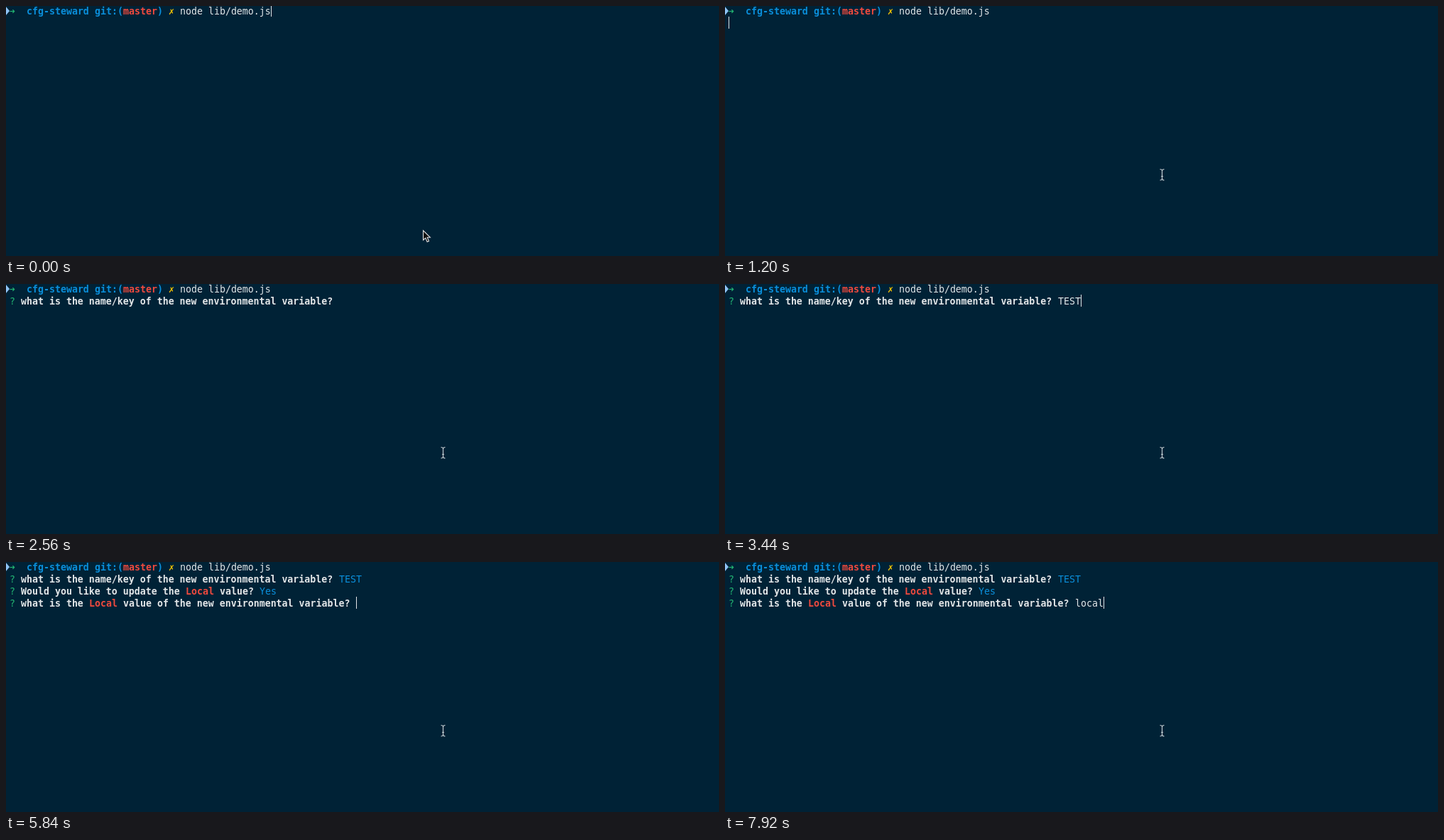
An HTML page with a canvas for the animation above (8000 ms loop, 1004 by 353 pixels).

```html
<!DOCTYPE html>
<html lang="en">
<head>
<meta charset="utf-8">
<title>Terminal session</title>
<style>
  html, body { margin: 0; height: 100%; overflow: hidden; background: #002236; }
  canvas { display: block; }
</style>
</head>
<body>
<canvas id="stage" width="1004" height="353"></canvas>
<script>
const ctx = document.getElementById('stage').getContext('2d');
const LOOP = 8000, COL = 8, ROW = 17, LEFT = 5, BASELINE = 12;
const BG = '#002236', WHITE = '#e3e6e8', BLUE = '#0a8fdb', RED = '#f04a3e',
      GREEN = '#22b573', YELLOW = '#fdc800', GRAY = '#5c7787';

function put(text, col, row, color, bold) {
  ctx.font = `${bold ? 'bold ' : ''}13.288px "DejaVu Sans Mono", monospace`;
  ctx.fillStyle = color;
  ctx.fillText(text, LEFT + col * COL, BASELINE + row * ROW);
}

// Each part is [text, color, bold]; returns the column after the last one.
function line(row, parts) {
  let col = 0;
  for (const [text, color, bold] of parts) {
    put(text, col, row, color, bold);
    col += text.length;
  }
  return col;
}

const question = (row, ...parts) => line(row, [['? ', GREEN], ...parts]);
const bold = (text, color = WHITE) => [text, color, true];

function caret(col, row) {
  ctx.fillStyle = WHITE;
  ctx.fillRect(LEFT + col * COL, row * ROW - 2, 1, ROW);
}

// Number of key presses made so far.
const typed = (t, times) => times.filter(time => t >= time).length;

function prompt() {
  ctx.fillStyle = '#8fc3f5';
  ctx.beginPath();
  ctx.moveTo(0, 1);
  ctx.lineTo(5, 7);
  ctx.lineTo(0, 13);
  ctx.fill();
  line(0, [
    bold('➜  ', GREEN), bold('cfg-steward ', BLUE), bold('git:(', BLUE),
    bold('master', RED), bold(') ', BLUE), bold('✗ ', YELLOW), ['node lib/demo.js', WHITE],
  ]);
}

function terminal(t) {
  prompt();
  if (t < 1200) {
    if (t < 560 || t >= 1040) caret(46, 0);
    return;
  }
  if (t < 1760) return caret(0, 1);

  const answered = t >= 3920, chosen = t >= 5840;
  const key = 'TEST'.slice(0, typed(t, [3120, 3200, 3280, 3440]));
  const keyEnd = question(1, bold('what is the name/key of the new environmental variable? '),
    [key, answered ? BLUE : WHITE]);
  if (!answered) {
    if (t < 2560 || t >= 3040) caret(keyEnd, 1);
    return;
  }

  question(2, bold('Would you like to update the '), bold('Local', RED), bold(' value? '),
    chosen ? ['Yes', BLUE] : ['(Use arrow keys)', GRAY]);
  if (!chosen) {
    put('❯ Yes', 0, 3, BLUE);
    put('No', 2, 4, WHITE);
    return;
  }

  const value = 'local'.slice(0, typed(t, [7520, 7680, 7760, 7840, 7920]));
  const valueEnd = question(3, bold('what is the '), bold('Local', RED),
    bold(' value of the new environmental variable? '), [value, WHITE]);
  if (t < 6640 || t >= 7120) caret(valueEnd, 3);
}

function arrowPointer(x, y) {
  const shape = new Path2D('M0 0V13.5L3.2 10.6L5.6 16L8 15L5.7 9.7H9.8Z');
  ctx.save();
  ctx.translate(x, y);
  ctx.fillStyle = '#101010';
  ctx.fill(shape);
  ctx.strokeStyle = '#e4e4e4';
  ctx.lineWidth = 1.1;
  ctx.stroke(shape);
  ctx.restore();
}

function textPointer(x, y) {
  ctx.save();
  ctx.translate(x + 0.5, y + 0.5);
  ctx.strokeStyle = '#c3cbd0';
  ctx.lineWidth = 1.2;
  ctx.stroke(new Path2D('M-3 -8Q0 -8 0 -5.5Q0 -8 3 -8M0 -5.5V5M-3 7.5Q0 7.5 0 5Q0 7.5 3 7.5M-1.5 2H1.5'));
  ctx.restore();
}

function pointer(t) {
  if (t < 80) return arrowPointer(587.5, 317);
  const p = Math.min(1, Math.floor(t / 80) / 4), q = 1 - p;
  const bend = (from, via, to) => q * q * from + 2 * q * p * via + p * p * to;
  textPointer(Math.round(bend(590, 663, 615)), Math.round(bend(318, 280, 238)));
}

function draw(now) {
  const t = now % LOOP;
  ctx.fillStyle = BG;
  ctx.fillRect(0, 0, 1004, 353);
  terminal(t);
  pointer(t);
  requestAnimationFrame(draw);
}
draw(0);
</script>
</body>
</html>
```
